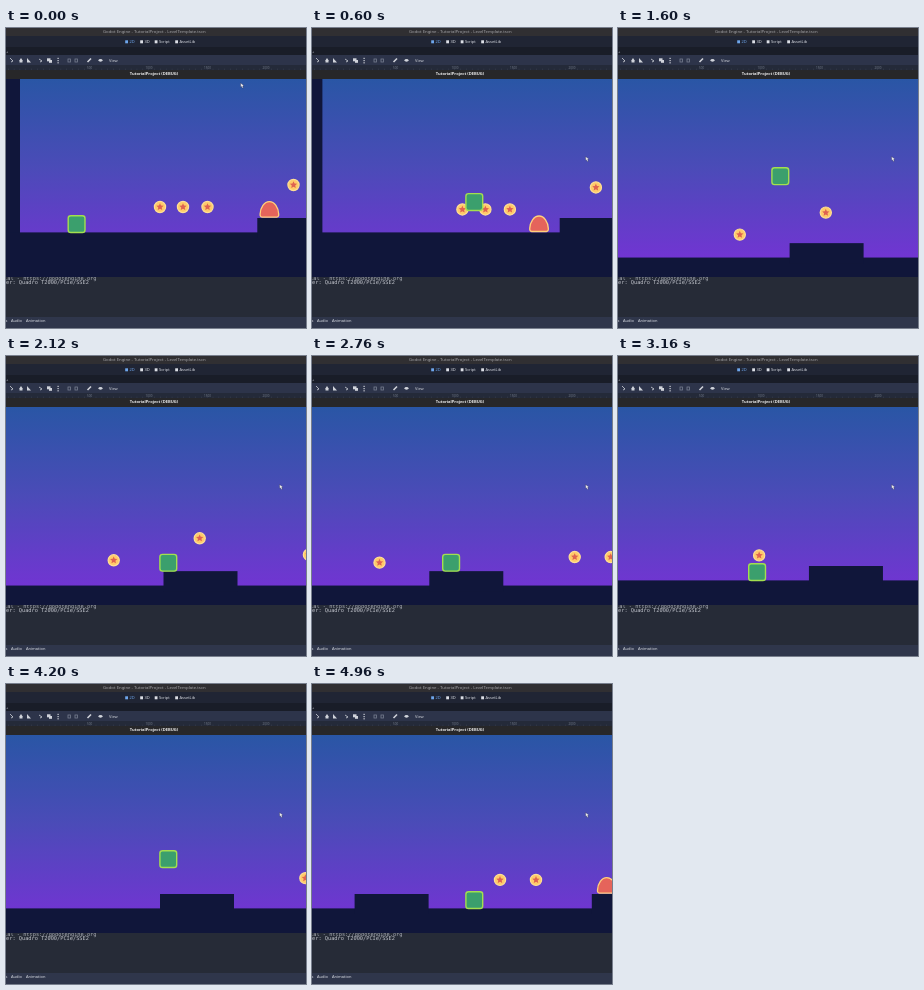
Animation, 300 px wide and 300 px high, one loop 5000 ms. Source, as an HTML page with a canvas:

```html
<!DOCTYPE html>
<html lang="en">
<head>
<meta charset="utf-8">
<title>Platformer debug run</title>
<style>
html, body { margin: 0; width: 100%; height: 100%; overflow: hidden; background: #262b37; }
canvas { display: block; width: 300px; height: 300px; }
</style>
</head>
<body>
<canvas id="stage" width="300" height="300"></canvas>
<script>
const ctx = document.getElementById('stage').getContext('2d');
const LOOP = 5000, STEP = 40, GRAVITY = 2030;
const NAVY = '#10163a', GROUND = 204.4, LEDGE = 190;
const SANS = '"Noto Sans", sans-serif';

// Player: horizontal keys [seconds, x], jumps [seconds, start y, upward speed].
const RUN = [[0.04, 70], [0.56, 164], [1.08, 181], [1.12, 185], [1.72, 255.5], [2.14, 255.5],
  [2.4, 298], [2.62, 298], [2.76, 272.5], [3.2, 191.5], [3.55, 191.5], [3.6, 200],
  [3.84, 242], [4.09, 242], [4.2, 259], [4.96, 370.4]];
const JUMPS = [[0, 195.5, 0], [0.56, 195.5, 592], [1.12, 179, 605], [2.14, 181, 450],
  [2.93, 181, 0], [3.5, 195.5, 312], [4, 195.5, 408], [4.36, 181, 580]];
const COINS = [
  { x: 154, y: 179, taken: 0.62 }, { x: 177, y: 179, taken: 0.62 }, { x: 201.5, y: 179, taken: 3.03 },
  { x: 287.5, y: 157, taken: 2.2 }, { x: 396.7, y: 173.4 }, { x: 432.7, y: 173.4 }
];
const FADE = 0.56, STOMP = 1.12, BOB = 1.1;

const clamp = (v, lo, hi) => Math.max(lo, Math.min(hi, v));

function along(keys, t) {
  if (t <= keys[0][0]) return keys[0][1];
  const i = keys.findIndex(k => k[0] >= t);
  if (i < 0) return keys[keys.length - 1][1];
  const [t0, a] = keys[i - 1], [t1, b] = keys[i];
  return a + (b - a) * (t - t0) / (t1 - t0);
}

function playerAt(t) {
  const x = along(RUN, t);
  const floor = x > 242 && x < 334 ? 181 : 195.5;
  const [start, y, speed] = JUMPS.filter(j => j[0] <= t).pop();
  const dt = t - start;
  return { x, y: Math.min(floor, y - speed * dt + GRAVITY * dt * dt / 2) };
}

// The camera moves only when the player pushes against its drag margins.
function cameraAt(t) {
  let x = 0, y = 0;
  for (let ms = 0; ms <= t * 1000 + 0.5; ms += 10) {
    const p = playerAt(ms / 1000);
    x = Math.max(0, clamp(x, p.x - 161.7, p.x - 138.5));
    y = clamp(y, 114 - p.y, 215.5 - p.y);
  }
  return { x, y };
}

function rect(x, y, w, h, color) {
  ctx.fillStyle = color;
  ctx.fillRect(x, y, w, h);
}

function text(str, x, y, color, font = '4px ' + SANS, align = 'left') {
  ctx.font = font;
  ctx.textAlign = align;
  ctx.textBaseline = 'alphabetic';
  ctx.fillStyle = color;
  ctx.fillText(str, x, y);
}

function outline(fill, stroke, width) {
  ctx.fillStyle = fill;
  ctx.fill();
  ctx.strokeStyle = stroke;
  ctx.lineWidth = width;
  ctx.stroke();
}

function drawCoin(coin, t) {
  const age = clamp((t - (coin.taken ?? LOOP)) / FADE, 0, 1);
  if (age === 1) return;
  const y = coin.y + 1.25 * (1 - Math.cos(2 * Math.PI * t / BOB));
  ctx.save();
  ctx.globalAlpha = 1 - age ** 3;
  ctx.translate(coin.x, y);
  ctx.beginPath();
  ctx.arc(0, 0, 5.6, 0, 2 * Math.PI);
  outline('#ffcb69', '#ffdf94', 1.2);
  ctx.beginPath();
  for (let i = 0; i < 10; i++) {
    const a = i * Math.PI / 5 - Math.PI / 2, r = i % 2 ? 1.8 : 3.8;
    ctx.lineTo(r * Math.cos(a), r * Math.sin(a));
  }
  ctx.closePath();
  ctx.fillStyle = '#df6251';
  ctx.fill();
  ctx.restore();
}

function drawEnemy(x, floor) {
  ctx.save();
  ctx.translate(x, floor);
  ctx.beginPath();
  ctx.moveTo(-7.4, -0.9);
  ctx.quadraticCurveTo(-9.5, -1, -9.3, -4);
  ctx.bezierCurveTo(-9, -10.5, -5.2, -16.4, 0, -16.4);
  ctx.bezierCurveTo(5.2, -16.4, 9, -10.5, 9.3, -4);
  ctx.quadraticCurveTo(9.5, -1, 7.4, -0.9);
  ctx.closePath();
  outline('#e5645b', '#ffd07c', 1.3);
  ctx.restore();
}

function drawPlayer({ x, y }) {
  ctx.beginPath();
  ctx.roundRect(x - 7.8, y - 7.8, 16.8, 16.8, 2.6);
  outline('#3b9f6d', '#a3df4f', 1.4);
}

function drawGame(t) {
  const cam = cameraAt(t);
  ctx.save();
  ctx.beginPath();
  ctx.rect(0, 51, 300, 198);
  ctx.clip();
  const sky = ctx.createLinearGradient(0, 50, 0, 230);
  sky.addColorStop(0, '#2956a5');
  sky.addColorStop(0.5, '#4b4bb8');
  sky.addColorStop(1, '#7135d2');
  rect(0, 50, 300, 199, sky);

  ctx.translate(-cam.x, cam.y);
  rect(-20, -50, 34, 300, NAVY);
  rect(0, GROUND, 900, 100, NAVY);
  rect(251.3, LEDGE, 74, 20, NAVY);
  rect(488.5, LEDGE, 200, 20, NAVY);

  COINS.forEach(c => drawCoin(c, t));
  if (t < STOMP) {
    const fall = Math.max(0, t - 0.4);
    drawEnemy(263.4 - 54.6 * t, Math.min(GROUND, LEDGE + GRAVITY * fall * fall / 2));
  }
  drawEnemy(503.5 + 54.6 * (4.96 - t), LEDGE);
  drawPlayer(playerAt(t));
  ctx.restore();
}

function drawToolbar() {
  const ink = '#d0d3da';
  ctx.strokeStyle = ctx.fillStyle = ink;
  ctx.lineWidth = 0.8;
  const path = (...pts) => {
    ctx.beginPath();
    pts.forEach(([x, y]) => ctx.lineTo(x, y));
  };
  path([4, 30], [7, 33], [5, 34]); ctx.stroke();
  path([13, 33], [15, 30], [17, 33]); ctx.fill();
  ctx.fillRect(13.5, 33, 3, 1.5);
  path([21, 30], [25, 34.5], [21, 34.5]); ctx.fill();
  path([33, 31], [36, 33], [34, 34]); ctx.stroke();
  ctx.fillRect(41, 30.3, 3.5, 3);
  ctx.fillRect(43, 32, 3, 2.8);
  for (const y of [29.8, 32, 34.2]) ctx.fillRect(51.5, y, 1.2, 1.2);
  ctx.strokeStyle = '#777e90';
  ctx.strokeRect(62, 31, 2.5, 3);
  ctx.strokeRect(69, 31, 2.5, 3);
  ctx.strokeStyle = ink;
  path([81.5, 34], [85, 30.5]);
  ctx.lineWidth = 1.6;
  ctx.stroke();
  ctx.beginPath();
  ctx.ellipse(94.5, 32.3, 2, 1.4, 0, 0, 7);
  ctx.fill();
  text('View', 103, 33.7, ink);
}

function drawEditor() {
  rect(0, 0, 300, 300, '#262b37');
  rect(0, 0, 300, 8, '#302f32');
  text('Godot Engine - TutorialProject - LevelTemplate.tscn', 148.3, 5.3, '#a3a3a7', '4.3px ' + SANS, 'center');

  rect(0, 8, 300, 11, '#202534');
  const ink = '#dcdfe6';
  const tabs = [['2D', 123.5, '#6ea6ec'], ['3D', 138.5, ink], ['Script', 153, ink], ['AssetLib', 173.5, ink]];
  for (const [label, x, color] of tabs) {
    rect(x - 4.3, 12.3, 2.8, 3, color);
    text(label, x, 15.4, color);
  }

  rect(0, 19, 300, 8, '#191d28');
  text('+', 0, 24.5, '#aeb2bd');
  rect(0, 27, 300, 10, '#2d344a');
  drawToolbar();

  rect(0, 37, 300, 5, '#242a39');
  for (let x = 2; x < 300; x += 5.85) rect(x, 40.5, 0.5, 1.5, '#3a4050');
  ['500', '1000', '1500', '2000'].forEach((n, i) => text(n, 81 + 58.5 * i, 40.6, '#727988', '3px ' + SANS));

  rect(0, 42, 300, 9, '#272729');
  text('TutorialProject (DEBUG)', 148, 47.4, '#f0f0f0', 'bold 4.1px ' + SANS, 'center');

  const mono = '5.3px "DejaVu Sans Mono", monospace';
  text('stable.official - https://godotengine.org', 90.5, 251.6, '#a9adb6', mono, 'right');
  text('er: Quadro T2000/PCIe/SSE2', 0, 256.2, '#c0c3cb', mono);
  rect(0, 289, 300, 11, '#2f364b');
  text('s', -0.6, 294.4, ink);
  text('Audio', 5, 294.4, ink);
  text('Animation', 20, 294.4, ink);
}

function drawCursor(t) {
  const p = clamp((t - 0.1) / 0.5, 0, 1), ease = p * p * (3 - 2 * p);
  ctx.save();
  ctx.translate(234.5 + 39 * ease, 55 + 73.5 * ease);
  ctx.beginPath();
  [[0, 0], [3.4, 2.6], [2.2, 3], [2.8, 4.8], [1.8, 5], [1, 3.4], [0.2, 3.8]].forEach(([x, y]) => ctx.lineTo(x, y));
  ctx.closePath();
  outline('#f4f4f4', '#24284a', 0.35);
  ctx.restore();
}

function frame(now) {
  const t = Math.floor(now % LOOP / STEP) * STEP / 1000;
  drawEditor();
  drawGame(t);
  drawCursor(t);
  requestAnimationFrame(frame);
}
frame(0);
</script>
</body>
</html>
```
